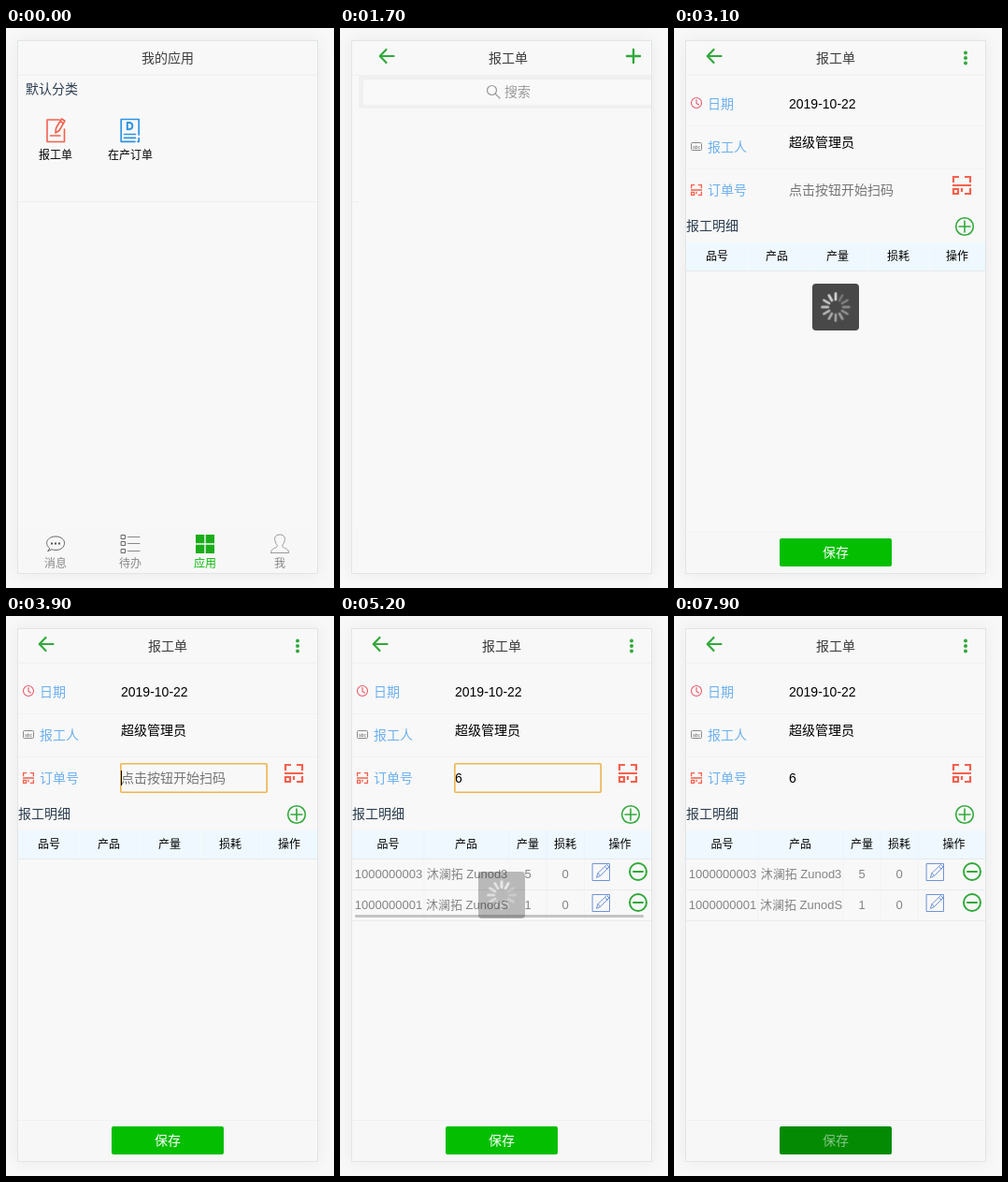
Write an HTML page that moves like this. It is 351 px wide and 598 px high and loops after 8 s.

```html
<!DOCTYPE html>
<html lang="zh-CN">
<head>
<meta charset="utf-8">
<title>报工单</title>
<style>
html, body { margin: 0; width: 100%; height: 100%; overflow: hidden; background: #f8f8f8; }
.phone {
  position: absolute; left: 12px; top: 13px; width: 320px; height: 568px;
  border: 1px solid #e2e5e6; box-shadow: 0 0 18px rgba(0, 0, 0, .06);
}
svg { position: absolute; left: 0; top: 0; display: block; }
text { font: 14px "Liberation Sans", "Noto Sans CJK SC", "Noto Sans CJK", sans-serif; }
.s12 { font-size: 12px; }
.s13 { font-size: 13px; fill: #858585; }
.mid { text-anchor: middle; }
.title { fill: #3c3c3c; }
.dark { fill: #2c3e50; }
.label { fill: #6db0ef; }
.tab { fill: #888; }
.line { fill: none; stroke-linecap: round; stroke-linejoin: round; }
.green { stroke: #31a93a; }
.red { stroke: #f4604e; }
.grey { stroke: #888; }
.page { fill: #f8f8f8; }

/* scene timing: one 8 s loop of hard steps */
.t { animation: 8s step-end -15ms infinite; }
#home { animation-name: home; }
#list { animation-name: list; }
#form { animation-name: form; }
#press { animation-name: press; }
#toast { animation-name: toast; }
#hint { animation-name: hint; }
#typed { animation-name: typed; }
#focus { animation-name: focus; }
#caret0 { animation-name: caret0; }
#caret1 { animation-name: caret1; }
#empty { animation-name: empty; }
#rows { animation-name: rows; }
#scroll { animation-name: scroll; }
#save { animation-name: save; }
#saveText { animation-name: saveText; }
#wheel { transform-origin: 173px 298px; animation: spin 1s steps(12) infinite; }

@keyframes home {
  0% { transform: none; }
  18.75% { transform: translateX(-106px); }
  20% { transform: translateX(-202px); }
  21.25% { transform: translateX(-313px); }
  22.5%, 100% { transform: translateX(-330px); }
}
@keyframes list {
  0% { transform: translateX(330px); }
  18.75% { transform: translateX(214px); }
  20% { transform: translateX(118px); }
  21.25% { transform: translateX(7px); }
  22.5% { transform: none; }
  35% { transform: translateX(-9px); }
  36.25% { transform: translateX(-106px); }
  37.5% { transform: translateX(-202px); }
  38.125% { transform: translateX(-313px); }
  38.75%, 100% { transform: translateX(-330px); }
}
@keyframes form {
  0% { transform: translateX(330px); }
  35% { transform: translateX(311px); }
  36.25% { transform: translateX(214px); }
  37.5% { transform: translateX(118px); }
  38.125% { transform: translateX(7px); }
  38.75%, 100% { transform: none; }
}
@keyframes press { 0% { opacity: 0; } 17.5%, 100% { opacity: 1; } }
@keyframes toast {
  0% { opacity: 1; }
  40% { opacity: .7; }
  41.25% { opacity: .35; }
  42.5% { opacity: 0; }
  61.25% { opacity: 1; }
  63.75% { opacity: .7; }
  65% { opacity: .36; }
  66.25% { opacity: .12; }
  67.5%, 100% { opacity: 0; }
}
@keyframes hint { 0% { opacity: 1; } 55%, 100% { opacity: 0; } }
@keyframes typed { 0% { opacity: 0; } 55%, 100% { opacity: 1; } }
@keyframes focus { 0%, 98.75%, 100% { opacity: 0; } 48.75% { opacity: 1; } }
@keyframes caret0 { 0%, 53.75%, 100% { opacity: 0; } 48.75% { opacity: 1; } }
@keyframes caret1 {
  0%, 60%, 71.25%, 82.5%, 95%, 100% { opacity: 0; }
  55%, 66.25%, 77.5%, 88.75% { opacity: 1; }
}
@keyframes empty { 0% { opacity: 1; } 63.75%, 100% { opacity: 0; } }
@keyframes rows { 0% { opacity: 0; } 63.75%, 100% { opacity: 1; } }
@keyframes scroll { 0%, 67.5%, 100% { opacity: 0; } 63.75% { opacity: 1; } }
@keyframes save { 0% { fill: #04be02; } 98.75%, 100% { fill: #048b03; } }
@keyframes saveText { 0% { fill: #fff; } 98.75%, 100% { fill: #86c486; } }
@keyframes spin { to { transform: rotate(360deg); } }
</style>
</head>
<body>
<div class="phone"></div>
<svg width="351" height="598" viewBox="0 0 351 598">
  <defs>
    <clipPath id="screen"><path d="M13 14H333V582H13Z"/></clipPath>
    <path id="back" class="line green" stroke-width="2.2" d="M50.5 30H36M42.5 23L35.7 30L42.5 37"/>
    <path id="scan" class="red" fill="none" stroke-width="2.2"
      d="M1 7V1H7M13 1H19V7M0 10H20M1 13V19H6V14H1M13 19H19V13M10 13V17"/>
    <g id="edit" class="line" stroke="#6f93d6" stroke-width="1">
      <path d="M.5 .5H18.5V18.5H.5Z"/>
      <path d="M4.5 15L6 10.5L15.5 1.5L18 4L8.5 13.5ZM6 10.5L8.5 13.5M13.5 3.5L16 6"/>
    </g>
    <g id="minus" class="line green" stroke-width="2"><circle r="9"/><path d="M-5 0H5"/></g>
    <path id="spoke" d="M173 290V283.5" stroke="#fff" stroke-width="2.6" stroke-linecap="round"/>
  </defs>

  <g clip-path="url(#screen)">
    <g id="home" class="t">
      <path class="page" d="M13 14H333V582H13Z"/>
      <path d="M13 50H333M13 185.5H333" stroke="#eeeeef"/>
      <path id="press" class="t" d="M13 86H93V176H13Z" fill="#e4e4e4"/>
      <text class="mid title" x="173" y="37">我的应用</text>
      <text class="dark" x="21" y="70">默认分类</text>

      <g class="line red" stroke-width="1.6">
        <path d="M57 98H44V121.500H62.500V108"/>
        <path d="M53.500 107L59.500 97L63 99.200L57 109.500L53 112Z"/>
        <path d="M58 99.500L61.500 101.800M47.500 115H58"/>
      </g>
      <text class="s12 mid" x="53" y="140">报工单</text>

      <g class="line" stroke="#2c93e3" stroke-width="1.7">
        <path d="M142.200 114V97.500H123.200V121.300H138M142.200 117.500V121.300H141"/>
        <path d="M126.500 113.500H138.500M126.500 117.300H138.500"/>
        <path d="M129.800 101V108.200H131.500C136.500 108.200 136.500 101 131.500 101Z" stroke-width="2"/>
      </g>
      <text class="s12 mid" x="133" y="140">在产订单</text>

      <path d="M13 535H333V582H13Z" fill="#f7f7f8"/>
      <path class="line" stroke="#666" d="M46.500 555.500C40 550 45 543 53 543C66 543 65.500 557.500 53 557.500C51 557.500 50 557 49 556.700L45 558.500Z"/>
      <path d="M48 550.500h2m2 0h2m2 0h2" stroke="#555" stroke-width="2"/>
      <g class="line grey">
        <path d="M123.500 541.500h4v4h-4zM123.500 548.500h4v4h-4zM123.500 556.500h4v4h-4z" stroke="#666"/>
        <path d="M130.500 543.500H143M130.500 550.500H143M130.500 558.500H143"/>
        <path d="M283.500 560.500H302.500C302.500 556 299 556 296.500 554.500C295 553.500 296 552 297 550.500C300 545 298 541 293 541C288 541 286 545 289 550.500C290 552 291 553.500 289.500 554.500C287 556 283.500 556 283.500 560.500Z" stroke="#999"/>
      </g>
      <path d="M203 541h9.300v9.300H203zM213.700 541h9.300v9.300h-9.300zM203 551.700h9.300v9.300H203zM213.700 551.700h9.300v9.300h-9.300z" fill="#1aad19"/>
      <g class="mid">
        <text class="s12 tab" x="53" y="576">消息</text>
        <text class="s12 tab" x="133" y="576">待办</text>
        <text class="s12" x="213" y="576" fill="#09bb07">应用</text>
        <text class="s12 tab" x="293" y="576">我</text>
      </g>
    </g>

    <g id="list" class="t">
      <path class="page" d="M13 14H333V582H13Z"/>
      <use href="#back"/>
      <text class="mid title" x="173" y="37">报工单</text>
      <path class="line green" stroke-width="2.4" d="M307 23V37M300 30H314"/>
      <path d="M13 50H333V86H13Z" fill="#f0f0f1"/>
      <rect x="18" y="55" width="310" height="27" rx="3" fill="#f9f9f9"/>
      <g class="line" stroke="#999" stroke-width="1.2">
        <circle cx="155.500" cy="66.500" r="5"/><path d="M159.300 70.300L164 75"/>
      </g>
      <text x="169" y="73" fill="#999">搜索</text>
    </g>

    <g id="form" class="t">
      <path class="page" d="M13 14H333V582H13Z"/>
      <path d="M13 50H333" stroke="#eeeeef"/>
      <path d="M13 104.500H333M13 150.500H333" stroke="#f2f2f2"/>
      <use href="#back"/>
      <text class="mid title" x="173" y="37">报工单</text>
      <g fill="#31a93a"><circle cx="312" cy="26.500" r="2"/><circle cx="312" cy="32" r="2"/><circle cx="312" cy="37.500" r="2"/></g>

      <g class="line" stroke="#ea5a6b" stroke-width="1.1"><circle cx="24" cy="80" r="5.500"/><path d="M24 76.500V80.500L26.500 82"/></g>
      <text class="label" x="36" y="86">日期</text>
      <text x="123" y="86">2019-10-22</text>

      <rect class="grey" x="18.500" y="122.500" width="11" height="8" rx="1" fill="none"/>
      <text class="mid" x="24" y="128.500" style="font-size:5px" fill="#666">abc</text>
      <text class="label" x="36" y="132">报工人</text>
      <text x="123" y="127">超级管理员</text>

      <use href="#scan" transform="translate(18 167) scale(.6)"/>
      <text class="label" x="36" y="178">订单号</text>
      <text id="hint" class="t" x="123" y="178" fill="#757575">点击按钮开始扫码</text>
      <text id="typed" class="t" x="123" y="178">6</text>
      <rect id="focus" class="t" x="122.800" y="157.800" width="156.400" height="30.400" rx="1" fill="none" stroke="#edb54d" stroke-width="1.600"/>
      <path id="caret0" class="t" d="M123 165h1v16h-1z"/>
      <path id="caret1" class="t" d="M131 165h1v16h-1z"/>
      <use href="#scan" x="298" y="158"/>

      <text class="dark" x="13" y="216">报工明细</text>
      <g class="line green" stroke-width="1.600"><circle cx="311" cy="212" r="9.300"/><path d="M305 212H317M311 206V218"/></g>

      <path d="M13 229H333V259H13Z" fill="#eef8fe"/>
      <path d="M13 259.500H333" stroke="#e6eaee"/>
      <g id="empty" class="t mid">
        <path d="M78.500 229V259M143.500 229V259M208.500 229V259M273.500 229V259" stroke="#f6fafc"/>
        <text class="s12" x="46" y="248">品号</text>
        <text class="s12" x="110" y="248">产品</text>
        <text class="s12" x="175" y="248">产量</text>
        <text class="s12" x="240" y="248">损耗</text>
        <text class="s12" x="303" y="248">操作</text>
      </g>
      <g id="rows" class="t mid">
        <path d="M90 229V325M181 229V325M221 229V325M261.500 229V325" stroke="#f0f2f5"/>
        <path d="M13 292.500H333M13 325.500H333" stroke="#e9ebef"/>
        <text class="s12" x="51.500" y="248">品号</text>
        <text class="s12" x="135" y="248">产品</text>
        <text class="s12" x="201" y="248">产量</text>
        <text class="s12" x="241" y="248">损耗</text>
        <text class="s12" x="299.500" y="248">操作</text>
        <text class="s13" x="52" y="280">1000000003</text>
        <text class="s13" x="136" y="280">沐澜拓 Zunod3</text>
        <text class="s13" x="201" y="280">5</text>
        <text class="s13" x="241" y="280">0</text>
        <text class="s13" x="52" y="313">1000000001</text>
        <text class="s13" x="136" y="313">沐澜拓 ZunodS</text>
        <text class="s13" x="201" y="313">1</text>
        <text class="s13" x="241" y="313">0</text>
        <use href="#edit" x="270" y="264"/><use href="#minus" x="319" y="273"/>
        <use href="#edit" x="270" y="297"/><use href="#minus" x="319" y="306"/>
      </g>
      <rect id="scroll" class="t" x="16" y="319" width="309" height="3" rx="1" fill="#c4c4c4"/>

      <path d="M13 538H333V582H13Z" fill="#f7f7f8"/>
      <path d="M13 538.500H333" stroke="#f0f0f1"/>
      <rect id="save" class="t" x="113" y="545" width="120" height="30" rx="2"/>
      <text id="saveText" class="t mid" x="173" y="565">保存</text>

      <g id="toast" class="t">
        <rect x="148" y="273" width="50" height="50" rx="4" fill="#111" fill-opacity=".76"/>
        <g id="wheel"></g>
      </g>
    </g>
  </g>
</svg>
<script>
const wheel = document.getElementById('wheel');
const spoke = document.getElementById('spoke');
for (let i = 0; i < 12; i++) {
  const bar = spoke.cloneNode();
  bar.removeAttribute('id');
  bar.setAttribute('transform', `rotate(${i * 30} 173 298)`);
  bar.setAttribute('opacity', .25 + .05 * i);
  wheel.append(bar);
}
</script>
</body>
</html>
```
